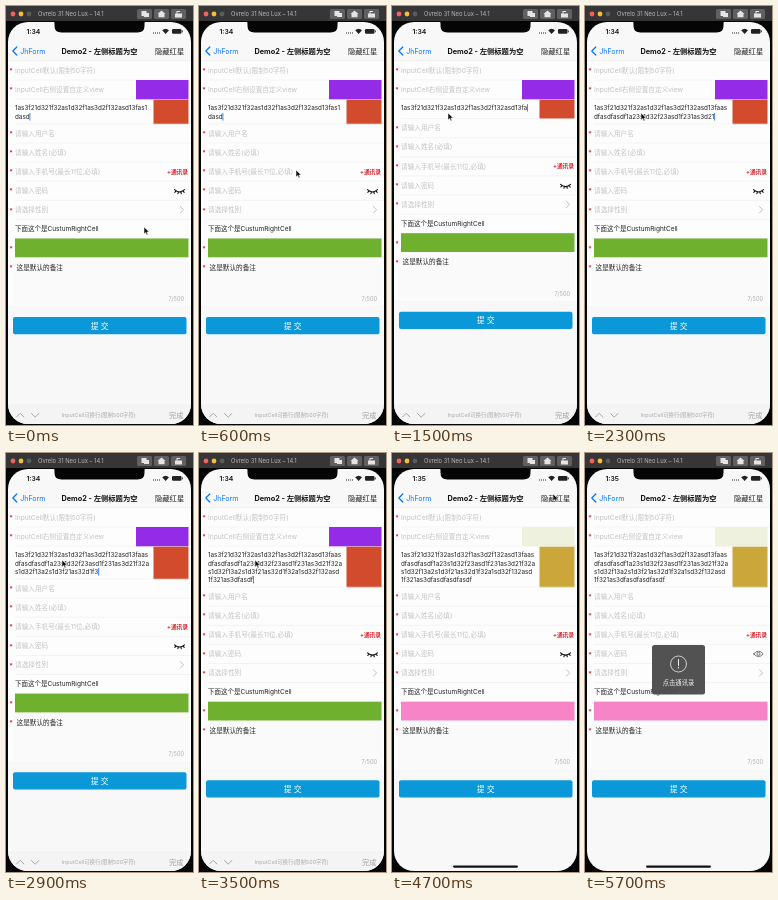
These frames come from a looping animation (187 px wide and 419 px high, 5.8 s). An HTML page:

```html
<!DOCTYPE html>
<html lang="zh">
<head>
<meta charset="utf-8">
<style>
html, body { margin: 0; width: 100%; height: 100%; overflow: hidden; background: #000; }
svg { display: block; width: 100vw; height: 100vh; }
text { font-family: Inter, "Noto Sans CJK SC", "Noto Sans CJK", sans-serif; font-size: 6.5px; fill: #222; white-space: pre; }
.hint { fill: #c3c3c7; font-size: 6.65px; }
.typed { font-size: 6.3px; }
.star { fill: #e0262c; font-size: 6.5px; font-weight: 700; }
.rule { stroke: #e9e9eb; stroke-width: .5; }
.line { fill: none; stroke-linecap: round; stroke-linejoin: round; }
</style>
</head>
<body>
<svg viewBox="0 0 187 419" preserveAspectRatio="none">
  <defs><clipPath id="glass"><rect x="2" y="16" width="183" height="402" rx="20"/></clipPath></defs>
  <rect width="187" height="419" fill="#050505"/>
  <rect width="187" height="15" fill="#363638"/>
  <circle cx="7" cy="8" r="2.4" fill="#fb5f57"/>
  <circle cx="15" cy="8" r="2.4" fill="#f9bd2e"/>
  <circle cx="23" cy="8" r="2.4" fill="#5b5b5d"/>
  <text x="32" y="10.3" style="font-size:5.8px;fill:#b9b9bb">Ovrelo 31 Neo Lux – 14.1</text>
  <g fill="#606062">
    <rect x="131" y="3" width="15" height="10" rx="1.5"/>
    <rect x="148" y="3" width="15" height="10" rx="1.5"/>
    <rect x="165" y="3" width="15" height="10" rx="1.5"/>
  </g>
  <g fill="#e4e4e6">
    <path d="M135.500 5h5v5h-5zM138 7h5v4h-5z"/>
    <path d="M151.500 8l4-3.500 4 3.500h-1v3.300h-6V8z"/>
    <path d="M169 7.500h7v4h-7zM170.500 7.500V5h3.500v1h-2.500v1.500z"/>
  </g>

  <g clip-path="url(#glass)">
    <rect y="15" width="187" height="404" fill="#f8f8f8"/>
    <g id="form"></g>
    <path class="rule" d="M2 54.7H185"/>
    <path class="line" d="M10.8 41l-4 4 4 4" stroke="#087cf5" stroke-width="1.3"/>
    <text x="14.2" y="47.6" style="fill:#087cf5;font-size:7.1px">JhForm</text>
    <text x="93.5" y="47.6" text-anchor="middle" style="font-size:7.3px;font-weight:700;fill:#111">Demo2 - 左侧标题为空</text>
    <text x="149" y="47.6" style="font-size:7.3px">隐藏红星</text>

    <text id="clock" x="20.5" y="28" style="font-size:6.8px;font-weight:600;fill:#111"></text>
    <g fill="#222">
      <path d="M147 26.5h1v1h-1zM149 26.5h1v1h-1zM151 26.5h1v1h-1zM153 26.5h1v1h-1z"/>
      <path d="M156.2 24.2q3.4-3 6.8 0l-3.4 3.800z"/>
      <rect x="166" y="23" width="9.500" height="4.800" rx="1.200"/><rect x="176" y="24.500" width=".8" height="1.800"/>
    </g>
    <rect x="61" y="412.500" width="65" height="2.200" rx="1.100" fill="#111"/>
    <g id="bar">
      <rect y="399" width="187" height="21" fill="#f4f4f5"/>
      <path class="rule" d="M0 399H187"/>
      <path class="line" d="M10.500 411l3.700-3.700 3.700 3.700M25.500 407.500l3.700 3.700 3.700-3.700" stroke="#a5a5a8" stroke-width="1"/>
      <text x="92.700" y="411.200" text-anchor="middle" style="font-size:5.400px;fill:#aaaaad">InputCell可换行(限制500字符)</text>
      <text x="163" y="411.700" style="font-size:7.200px;fill:#a0a0a3">完成</text>
    </g>
    <path d="M46.500 15h94q-2 0-2 3v2q0 6.500-7 6.500h-76q-7 0-7-6.500v-2q0-3-2-3z" fill="#050505"/>
  </g>

  <g id="toast">
    <rect x="67" y="192" width="53" height="49.5" rx="2.5" fill="#4b4b4b" opacity=".96"/>
    <circle cx="93.5" cy="211" r="8" fill="none" stroke="#eee" stroke-width=".8"/>
    <path d="M93.5 206.5v6" stroke="#eee" stroke-width="1" stroke-linecap="round"/>
    <circle cx="93.5" cy="214.8" r=".7" fill="#eee"/>
    <text x="93.5" y="231.5" text-anchor="middle" style="font-size:6.3px;fill:#f4f4f4">点击通讯录</text>
  </g>
  <path id="mouse" d="M0 0v7l1.7-1.5 1.1 2.4 1.2-.5-1.1-2.4H5.2z" fill="#111" stroke="#fff" stroke-width=".5"/>
</svg>
<script>
const LOOP = 5800, STEP = 100, LINE = 8.1, ROW = 19.1;
const el = id => document.getElementById(id);

const BASE = '1as3f21d321f32as1d32f1as3d2f132asd13fa';
const OLD_TAIL = 's1dasd';
const LINES = [
  BASE + 'as',
  'dfasdfasdf1a23s1d32f23asd1f231as3d21f32a',
  's1d32f13a2s1d3f21as32d1f32a1sd32f132asd',
  '1f321as3dfasdfasdfasdf'
];
const PALETTES = [
  [0, '#932be7', '#d24b2d', '#70b02f'],
  [4100, '#20302a', '#0a9168', '#04d2d7'],
  [4500, '#eff1df', '#cba73b', '#f684c7']
];
const MOUSE = [[0, 138, 221], [300, 138, 221], [900, 56, 107], [3700, 56, 107],
  [4100, 161, 41], [4800, 161, 41], [5100, 172, 197], [5300, 170, 179]];

const label = (x, y, s, attrs = 'class="hint"') => `<text x="${x}" y="${y}" ${attrs}>${s}</text>`;
const block = (x, y, w, h, fill) => `<rect x="${x}" y="${y}" width="${w}" height="${h}" fill="${fill}"/>`;
const rule = y => `<path class="rule" d="M9 ${y}H185"/>`;
const star = y => label(3.3, y + .5, '*', 'class="star"');
const stroke = (d, color, width) => `<path class="line" d="${d}" stroke="${color}" stroke-width="${width}"/>`;

// Split the typed string into the lines on screen.
function typedLines(t) {
  if (t < 1500) {
    const removed = Math.max(0, Math.min(6, (t - 800) / STEP));
    const all = BASE + OLD_TAIL.slice(0, OLD_TAIL.length - removed);
    return [all.slice(0, 40), all.slice(40)].filter(Boolean);
  }
  let left = BASE.length + Math.round((t - 1500) * 0.0475);
  const shown = [];
  for (const line of LINES) {
    if (left <= 0) break;
    shown.push(line.slice(0, left));
    left -= line.length;
  }
  return shown;
}

function eye(y, open) {
  return open
    ? stroke(`M168.8 ${y}q4.7-5.6 9.4 0q-4.7 5.6-9.4 0z`, '#555', .8) +
      `<circle cx="173.5" cy="${y}" r="1.5" fill="none" stroke="#555" stroke-width=".8"/>`
    : stroke(`M168.5 ${y - 1}q5 4.5 10 0M169.8 ${y + .4}l-1 1.2M172.3 ${y + 1.4}l-.4 1.5M174.9 ${y + 1.4}l.4 1.5M177.2 ${y + .4}l1 1.2`, '#111', 1.1);
}

function form(t) {
  const [, side, tall, wide] = PALETTES.filter(p => p[0] <= t).pop();
  const lines = typedLines(t);
  const inputHeight = Math.max(ROW, 8.2 + LINE * lines.length);
  const top = 93.5 + inputHeight;
  let out = block(2, 55, 183, top + ROW * 7 + 48 - 55, '#fdfdfd');

  ['InputCell默认(限制50字符)', 'InputCell右侧设置自定义view'].forEach((s, i) => {
    const y = 66.5 + i * ROW;
    out += star(y) + label(9, y, s) + rule(74 + i * ROW);
  });
  out += block(130, 74, 52.5, 19.3, side);

  lines.forEach((s, i) => {
    const cursor = i === lines.length - 1 && t < 4000
      ? '<tspan fill="#2878f0" font-weight="700" dx="-.8">|</tspan>' : '';
    out += label(9, 104.4 + i * LINE, s + cursor, 'class="typed"');
  });
  out += block(147.5, 93.7, 35, inputHeight, tall) + rule(top);

  ['请输入用户名', '请输入姓名(必填)', '请输入手机号(最长11位,必填)', '请输入密码', '请选择性别'].forEach((s, i) => {
    const y = top + i * ROW + 11.7;
    out += star(y) + label(9, y, s) + rule(top + (i + 1) * ROW);
  });
  out += label(182, top + ROW * 2 + 11.5, '+通讯录', 'text-anchor="end" style="font-size:5.7px;font-weight:700;fill:#d9262f"');
  out += eye(top + ROW * 3 + 9.5, t >= 5100);
  const chevron = top + ROW * 4 + 6.2;
  out += stroke(`M174.5 ${chevron}l3 3.2-3 3.2`, '#b9b9bc', .9);

  const custom = top + ROW * 5;
  out += label(9, custom + 11.7, '下面这个是CustumRightCell', '') + rule(custom + ROW);
  out += star(custom + ROW + 12) + block(9, custom + ROW, 173.5, 18.8, wide);

  const note = custom + ROW * 2;
  out += block(7, note + 2, 176, 45, '#fafafa') + star(note + 12);
  out += label(10.5, note + 12, '这是默认的备注', 'style="font-size:6.65px"');
  out += label(178, note + 43.5, '7/500', 'text-anchor="end" style="font-size:5.6px;fill:#b0b0b3"');

  out += `<rect x="7" y="${note + 59.5}" width="173.5" height="17.2" rx="2" fill="#0b98d9"/>`;
  out += label(93.7, note + 71, '提 交', 'text-anchor="middle" style="font-size:7.8px;fill:#fff"');
  return out;
}

function mouseAt(t) {
  const i = MOUSE.findIndex(p => p[0] > t);
  if (i < 0) return MOUSE[MOUSE.length - 1].slice(1);
  const [t0, x0, y0] = MOUSE[i - 1], [t1, x1, y1] = MOUSE[i];
  const u = (t - t0) / (t1 - t0), k = u * u * (3 - 2 * u);
  return [x0 + (x1 - x0) * k, y0 + (y1 - y0) * k];
}

function draw(t) {
  el('form').innerHTML = form(t);
  el('clock').textContent = t < 3900 ? '1:34' : '1:35';
  const slide = Math.max(0, Math.min(1, (t - 4000) / 300));
  el('bar').setAttribute('transform', `translate(0 ${21 * slide})`);
  el('toast').style.display = t >= 5300 ? '' : 'none';
  el('mouse').style.display = t < 5500 ? '' : 'none';
  el('mouse').setAttribute('transform', `translate(${mouseAt(t)})`);
}

const start = performance.now();
let last = -1;
function tick() {
  const t = Math.floor(((performance.now() - start) % LOOP) / STEP) * STEP;
  if (t !== last) draw(last = t);
  requestAnimationFrame(tick);
}
tick();
</script>
</body>
</html>
```
